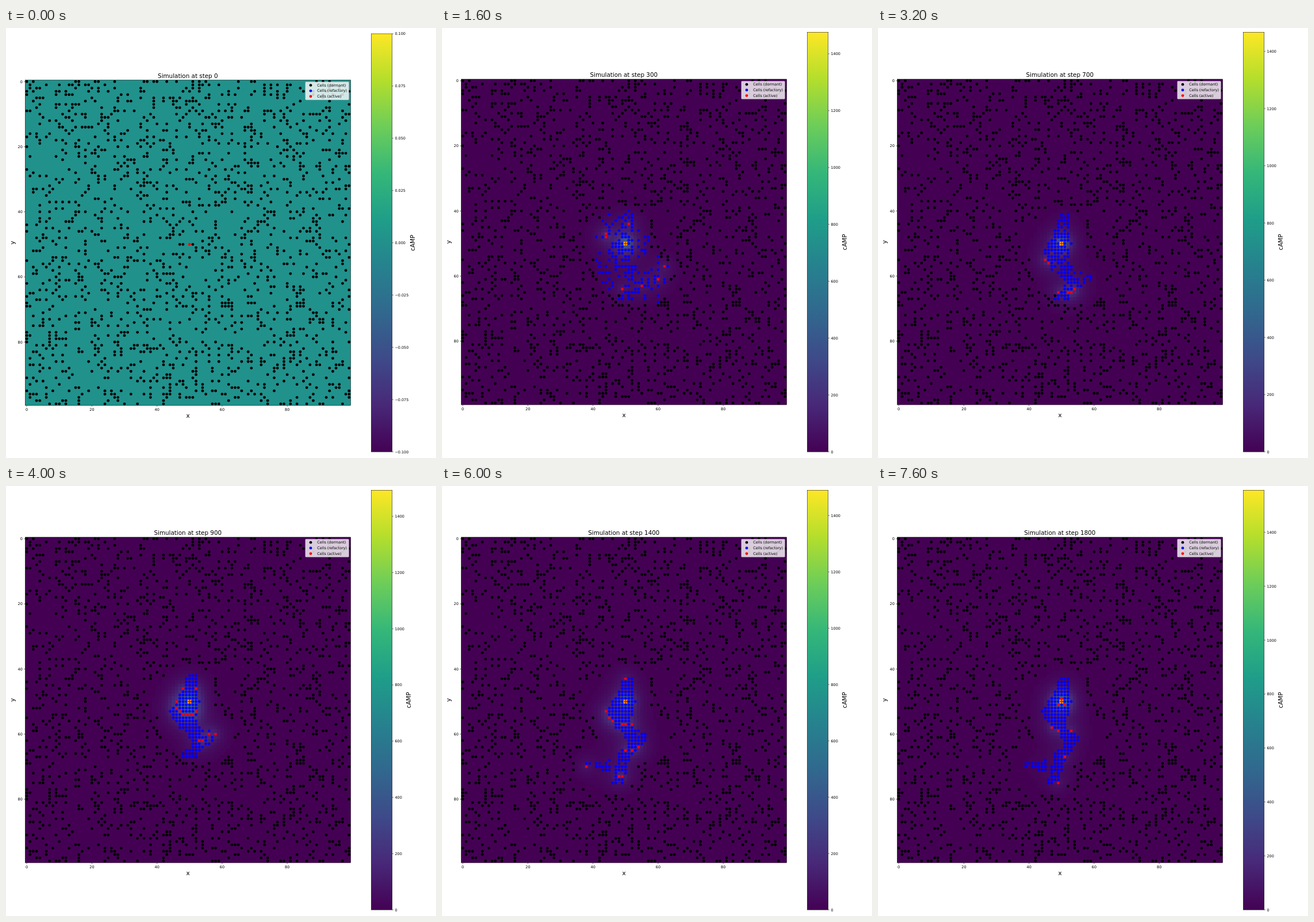
Animation, 748 px wide and 748 px high, one loop 8 s. Source, as an HTML page with a canvas:

```html
<!DOCTYPE html>
<html>
<head>
<meta charset="utf-8">
<style>
html, body { margin: 0; height: 100%; overflow: hidden; background: #fff; }
canvas { display: block; width: 748px; height: 748px; }
</style>
</head>
<body>
<canvas id="stage" width="748" height="748"></canvas>
<script>
const ctx = document.getElementById('stage').getContext('2d');
const FRAME = 400, COUNT = 20, N = 100, MID = 50;
const LEFT = 33.3, PITCH = 5.663, SIDE = N * PITCH;
const FONT = '"DejaVu Sans", sans-serif', SMALL = 6.48, BIG = 10.36;
const VIRIDIS = ['#440154', '#482878', '#3e4a89', '#31688e', '#26828e',
  '#1f9e89', '#35b779', '#6dcd59', '#b4de2c', '#fde725'];
const RGB = VIRIDIS.map(h => [1, 3, 5].map(i => parseInt(h.slice(i, i + 2), 16)));

// top of the colour scale in each frame
const PEAKS = [0.1, 468.5, 1460, 1440, 1476, 1409, 1430, 1422, 1467, 1510,
  1493, 1520, 1652, 1560, 1413, 1490, 1416, 1478, 1560, 1556];

// gathered body: row, left edge, right edge
const BODY = [[42.6, 49.6, 52.6], [47, 47.6, 52.4], [50, 45.8, 53.2], [53, 43.6, 52.2],
  [58, 46.8, 51.3], [60, 49.6, 55], [62, 50, 56], [64, 50, 54], [66, 47.5, 52.4],
  [69, 47, 50.6], [75, 45.6, 49.4]];

const clamp = (v, a, b) => Math.max(a, Math.min(b, v));
const mix = (a, b, k) => a + (b - a) * k;
const ramp = (v, a, b) => clamp((v - a) / (b - a), 0, 1);

// seeded random number for a cell
function noise(x, y, seed) {
  let h = Math.imul(x + 1, 374761393) ^ Math.imul(y + 1, 668265263) ^ Math.imul(seed, 974634777);
  h = Math.imul(h ^ h >>> 15, 2246822519);
  h = Math.imul(h ^ h >>> 13, 3266489917);
  return ((h ^ h >>> 16) >>> 0) / 2 ** 32;
}

function viridis(v) {
  const p = clamp(v, 0, 1) * 9, i = Math.min(8, Math.floor(p));
  return `rgb(${RGB[i].map((c, j) => Math.round(mix(c, RGB[i + 1][j], p - i)))})`;
}

const inOval = (x, y, cx, cy, rx, ry) => ((x - cx) / rx) ** 2 + ((y - cy) / ry) ** 2 < 1;
const fromMid = (x, y) => Math.hypot(x - MID, y - MID);

// has the signal woken the cells of this area yet?
function woken(x, y, step) {
  return step >= 100 && fromMid(x, y) < step * 0.07 + 1 &&
    (inOval(x, y, 49, 52, 9, 14) || inOval(x, y, 57, 61, 7, 8)) ||
    step >= 1000 && inOval(x, y, 44, 71, 10, 8);
}

function inBody(x, y, step) {
  if (step < 100 || fromMid(x, y) > step * 0.07 + 1) return false;
  if (y > 67 && step < 1000) return false;
  const age = ramp(step, 300, 1800), late = ramp(step, 1000, 1800);
  const limb = step >= 1000 && x < 46 && x > mix(33.5, 38.5, late) &&
    Math.abs(y - 69.6) < (x - 30) / 9;
  const stretch = y < MID ? mix(1.35, 1, ramp(step, 300, 1400)) : y > 66 ? mix(1.03, 1, late) : 1;
  const row = MID + (y - MID) / stretch;
  const i = BODY.findIndex(b => b[0] >= row);
  if (i < 1) return limb;
  const [a, b] = [BODY[i - 1], BODY[i]], k = ramp(row, a[0], b[0]);
  const arm = 6 * (1 - age) * Math.max(0, 1 - Math.abs(y - 60) / 5);
  const edge = x > mix(a[1], b[1], k) && x < mix(a[2], b[2], k) + arm;
  const filled = y > 67 ? mix(0.6, 0.95, late) : x > 53 ? mix(0.45, 1, age) : mix(0.5, 1, ramp(step, 300, 900));
  return (edge || limb) && noise(x, y, 2) < filled;
}

function eachCell(fn) {
  for (let y = 0; y < N; y++) for (let x = 0; x < N; x++) fn(x, y);
}

// dormant, refractory and active cells at a step
function cells(step) {
  const dormant = [], active = [[MID, MID]], taken = new Map();
  const take = (x, y) => taken.set(y * N + x, [x, y]);
  const pull = 1 - 0.3 * ramp(step, 300, 700);
  eachCell((x, y) => {
    if (noise(x, y, 1) < 0.16 && fromMid(x, y)) {
      if (!woken(x, y, step)) dormant.push([x, y]);
      else if (step < 700) take(Math.round(mix(MID, x, pull)), Math.round(mix(52, y, pull)));
    }
    if (inBody(x, y, step)) take(x, y);
  });
  const blue = [...taken.values()];
  // rings run outward from the middle, one every 350 steps
  const ring = 1.2 + (step + 300) % 350 * 0.02;
  const share = mix(0.15, 0.5, ramp(step, 300, 1100));
  for (const [x, y] of blue)
    if (Math.abs(fromMid(x, y) % 8 - ring) < 0.7 && noise(x, y, step) < share) active.push([x, y]);
  return { dormant, blue, active };
}

// share of the peak at a cell
function level(x, y, { blue, active }) {
  const d = fromMid(x, y);
  if (!d) return 1;
  let v = 0.42 * Math.exp(-d / 1.8), glow = 0;
  for (const [bx, by] of blue) v += 0.0006 * Math.exp(-((x - bx) ** 2 + (y - by) ** 2) / 20);
  for (const [ax, ay] of active.slice(1)) glow += 0.06 * Math.exp(-Math.hypot(x - ax, y - ay) / 2);
  return v + Math.min(glow, 0.16);
}

function text(s, x, y, size, align = 'left', turned) {
  ctx.save();
  ctx.translate(x, y);
  if (turned) ctx.rotate(-Math.PI / 2);
  ctx.font = `${size}px ${FONT}`;
  ctx.textAlign = align;
  ctx.fillStyle = '#000';
  ctx.fillText(s, 0, 0);
  ctx.restore();
}

function line(x1, y1, x2, y2) {
  ctx.beginPath();
  ctx.moveTo(x1, y1);
  ctx.lineTo(x2, y2);
  ctx.stroke();
}

function dot(x, y, color) {
  ctx.fillStyle = color;
  ctx.beginPath();
  ctx.arc(x, y, 2.4, 0, 7);
  ctx.fill();
}

function colorbar(frame) {
  const top = frame ? 7.3 : 10, bottom = 737.2, x = 635.3, w = 36.5;
  const fill = ctx.createLinearGradient(0, bottom, 0, top);
  VIRIDIS.forEach((c, i) => fill.addColorStop(i / 9, c));
  ctx.fillStyle = fill;
  ctx.fillRect(x, top, w, bottom - top);
  ctx.strokeRect(x, top, w, bottom - top);
  const peak = PEAKS[frame], base = frame ? 0 : -peak;
  const gap = [0.025, 100][frame] || 200;
  for (let v = base; v <= peak + 1e-9; v += gap) {
    const y = mix(bottom, top, (v - base) / (peak - base));
    line(x + w, y, x + w + 2.3, y);
    const label = frame ? String(v) : (v < -1e-9 ? '\u2212' : '') + Math.abs(v).toFixed(3);
    text(label, 676.4, y + 2.4, SMALL);
  }
  text('cAMP', [710.8, 699.7][frame] || 703.6, frame ? 372.5 : 373.7, BIG, 'center', true);
}

function legend(top) {
  ctx.fillStyle = 'rgba(255,255,255,0.8)';
  ctx.strokeStyle = 'rgba(204,204,204,0.8)';
  ctx.beginPath();
  ctx.roundRect(520.8, top + 3.4, 75.6, 31.2, 1.3);
  ctx.fill();
  ctx.stroke();
  ctx.strokeStyle = '#000';
  [['dormant', '#000'], ['refactory', '#00f'], ['active', '#f00']].forEach(([name, color], i) => {
    const y = top + 9.2 + i * 9.7;
    dot(530, y, color);
    text(`Cells (${name})`, 541.3, y + 2.1, SMALL);
  });
}

function draw(frame) {
  const step = frame < 2 ? frame : (frame - 1) * 100;
  const top = frame ? 89 : 90.4;
  const px = x => LEFT + (x + 0.5) * PITCH, py = y => top + (y + 0.5) * PITCH;
  const state = cells(step);
  ctx.fillStyle = '#fff';
  ctx.fillRect(0, 0, 748, 748);
  ctx.strokeStyle = '#000';
  ctx.lineWidth = 0.52;

  ctx.fillStyle = frame ? VIRIDIS[0] : '#21918c';
  ctx.fillRect(LEFT, top, SIDE, SIDE);
  if (frame) eachCell((x, y) => {
    const v = frame > 1 ? level(x, y, state) : +!fromMid(x, y);
    if (v < 0.006) return;
    const [l, t, r, b] = [px(x - 0.5), py(y - 0.5), px(x + 0.5), py(y + 0.5)].map(Math.round);
    ctx.fillStyle = viridis(v);
    ctx.fillRect(l, t, r - l, b - t);
  });
  for (const [list, color] of [[state.dormant, '#000'], [state.blue, '#00f'], [state.active, '#f00']])
    for (const [x, y] of list) dot(px(x), py(y), color);
  ctx.strokeRect(LEFT, top, SIDE, SIDE);

  for (let v = 0; v < N; v += 20) {
    line(px(v), top + SIDE, px(v), top + SIDE + 2.3);
    line(LEFT - 2.3, py(v), LEFT, py(v));
    text(v, px(v), top + SIDE + 9.6, SMALL, 'center');
    text(v, 28.8, py(v) + 2.4, SMALL, 'right');
  }
  text('Simulation at step ' + step, 316.3, top - 3.9, BIG, 'center');
  text('x', 316.5, top + SIDE + 21.6, BIG, 'center');
  text('y', 15.3, top + SIDE / 2, BIG, 'center', true);
  legend(top);
  colorbar(frame);
}

let shown = -1;
function tick(now) {
  const frame = Math.floor(now / FRAME) % COUNT;
  if (frame !== shown) draw(shown = frame);
  requestAnimationFrame(tick);
}
tick(performance.now());
</script>
</body>
</html>
```
